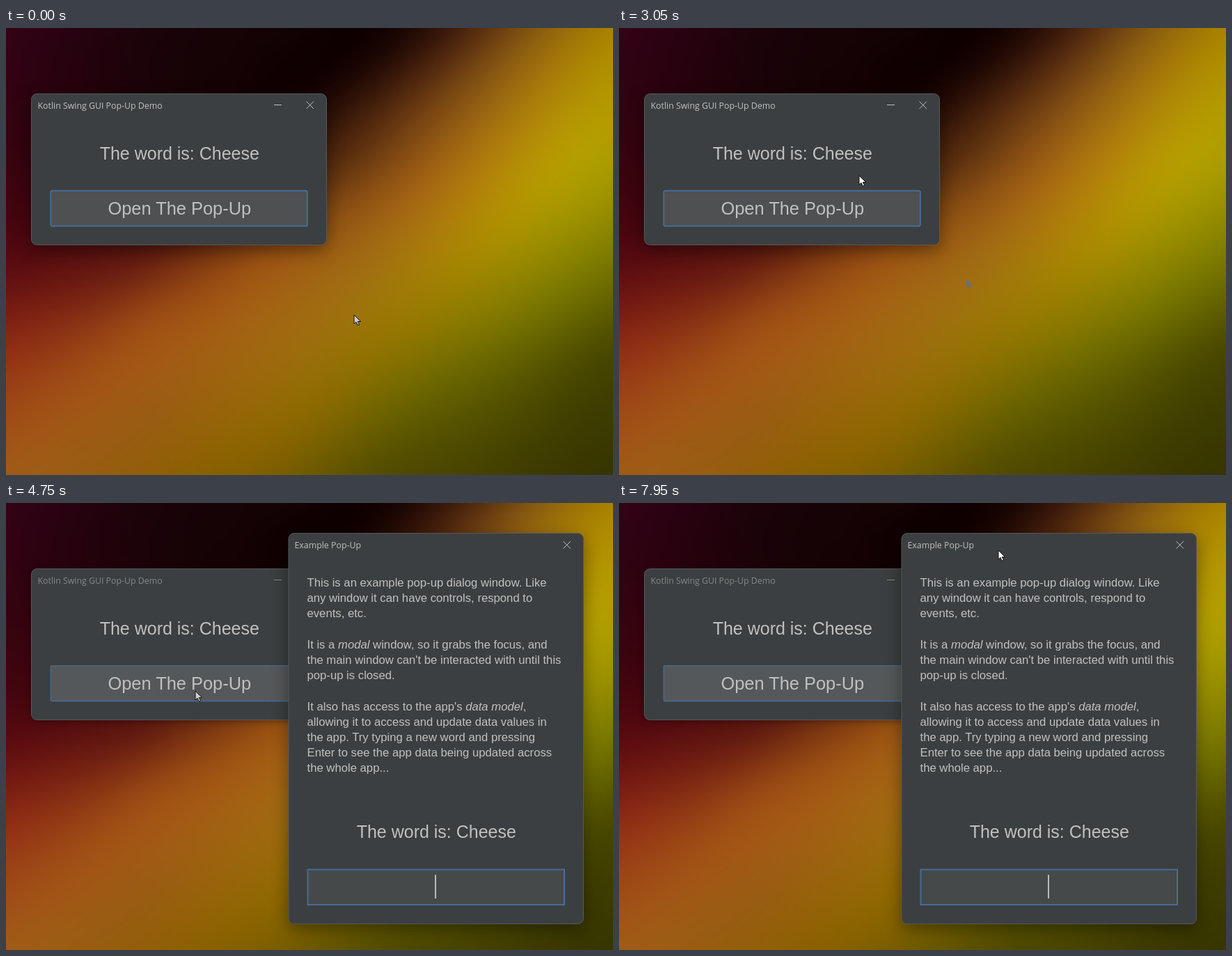
An HTML page with a canvas for the animation above (8 s loop, 872 by 642 pixels).

```html
<!DOCTYPE html>
<html lang="en">
<head>
<meta charset="utf-8">
<title>Pop-Up Demo</title>
<style>
  html, body { margin: 0; width: 100%; height: 100%; overflow: hidden; background: #140303; }
  canvas, svg { position: absolute; left: 0; top: 0; width: 872px; height: 642px; }
  text { fill: #c0c0c0; font-family: "Liberation Sans", Arial, sans-serif; white-space: pre; }
  .title { font: 12.35px "Open Sans", "Noto Sans", sans-serif; }
  .word, .label { font-size: 25px; text-anchor: middle; }
  .label { font-size: 25.4px; }
  .body { font-size: 16.7px; }
  .win { fill: #3c3f41; stroke: #55595c; }
  .active { filter: drop-shadow(0 7px 12px rgba(0, 0, 0, .4)); }
  .idle { filter: drop-shadow(0 2px 4px rgba(0, 0, 0, .3)); }
  .focus { stroke: #466d94; stroke-width: 2; }
  .icon { stroke: #c0c0c0; fill: none; }
</style>
</head>
<body>
<canvas id="back" width="436" height="321"></canvas>
<svg viewBox="0 0 872 642">
  <defs>
    <path id="arrow" d="M0 0V13L3 10.3L5.2 15L7.5 14L5.3 9.5H9.6Z"/>
  </defs>
  <g id="main">
    <rect id="frame" class="win" x="36.5" y="94.5" width="424" height="217" rx="8"/>
    <rect id="minHover" x="367" y="95" width="47" height="32" fill="#55575b"/>
    <text id="mainTitle" class="title" x="45.5" y="115.5">Kotlin Swing GUI Pop-Up Demo</text>
    <path id="minimise" class="icon" d="M385 110.5h11"/>
    <path class="icon" d="M431.5 105.5l10.5 10.5m0-10.5l-10.5 10.5"/>
    <text class="word" x="249.3" y="188.5">The word is: Cheese</text>
    <rect id="button" class="focus" x="64.3" y="233.7" width="368.5" height="50.8" rx="2"/>
    <text class="label" x="249.3" y="268">Open The Pop-Up</text>
  </g>
  <use id="ghost" href="#arrow" x="499" y="360" fill="#6e6e7c"/>
  <g id="popup">
    <rect class="win active" x="406" y="43.5" width="423.5" height="561" rx="8"/>
    <text class="title" x="414.5" y="65">Example Pop-Up</text>
    <path class="icon" d="M800.5 55l10.5 10.5m0-10.5l-10.5 10.5"/>
    <g id="lines"></g>
    <text class="word" x="618.3" y="481">The word is: Cheese</text>
    <rect class="focus" x="433.5" y="526.5" width="368.5" height="50.5" fill="#45494a"/>
    <rect id="caret" x="616" y="534" width="2" height="34" fill="#bbb"/>
  </g>
  <use id="cursor" href="#arrow" stroke="#111" stroke-width="1"/>
  <circle id="click" cx="271.5" cy="268.5" r="12.5" fill="rgba(226,216,10,.6)"/>
</svg>
<script>
const $ = id => document.getElementById(id);

// Wallpaper: smooth colour field through a few points (x, y, colour)
const spots = [
  [0, 0, '340316'], [200, 0, '1c030a'], [400, 0, '140303'], [560, 0, '180502'],
  [650, 0, '44200c'], [760, 0, '85580f'], [872, 0, 'a88200'],
  [0, 200, '3a040f'], [200, 150, '200408'], [420, 100, '160302'], [480, 200, '5f320f'],
  [560, 120, '5c300f'], [700, 100, '966411'], [872, 110, 'b29a00'], [800, 200, 'b49c00'],
  [600, 230, 'a46612'], [0, 330, '560a10'], [200, 330, '641e10'], [380, 330, '985212'],
  [520, 330, 'a06c12'], [700, 310, 'a88c00'], [872, 300, '868200'],
  [0, 450, '8a2a14'], [200, 420, '9a4a14'], [420, 450, '9e6c0e'], [600, 430, '907800'],
  [760, 400, '7a7600'], [872, 460, '4a4900'], [0, 642, 'a05a16'], [200, 560, '9a5c12'],
  [400, 580, '8a6600'], [560, 540, '6e6400'], [720, 560, '4e4c00'],
  [300, 642, '886000'], [540, 642, '544c00'], [872, 642, '383600']
];

// Distance is shortened along the diagonal so the bands run that way
function kernel(dx, dy) {
  const along = .5 * (.82 * dx - .57 * dy), across = .57 * dx + .82 * dy;
  return Math.sqrt(along * along + across * across + 1200);
}

function solveWeights() {
  const n = spots.length;
  const rows = spots.map(([x, y, hex]) => [
    ...spots.map(s => kernel(x - s[0], y - s[1])),
    ...[0, 2, 4].map(i => parseInt(hex.slice(i, i + 2), 16))
  ]);
  for (let c = 0; c < n; c++) {
    let p = c;
    for (let r = c; r < n; r++) if (Math.abs(rows[r][c]) > Math.abs(rows[p][c])) p = r;
    [rows[c], rows[p]] = [rows[p], rows[c]];
    for (let r = 0; r < n; r++) {
      if (r === c) continue;
      const f = rows[r][c] / rows[c][c];
      for (let k = c; k < n + 3; k++) rows[r][k] -= f * rows[c][k];
    }
  }
  return rows.map((row, i) => row.slice(n).map(v => v / row[i]));
}

function paintBack() {
  const weights = solveWeights(), ctx = $('back').getContext('2d');
  const img = ctx.createImageData(436, 321);
  for (let y = 0, i = 0; y < 321; y++) {
    for (let x = 0; x < 436; x++, i += 4) {
      let r = 0, g = 0, b = 0;
      for (let s = 0; s < spots.length; s++) {
        const k = kernel(2 * x + 1 - spots[s][0], 2 * y + 1 - spots[s][1]), w = weights[s];
        r += k * w[0];
        g += k * w[1];
        b += k * w[2];
      }
      img.data.set([r, g, b, 255], i);
    }
  }
  ctx.putImageData(img, 0, 0);
}

const body = `This is an example pop-up dialog window. Like
any window it can have controls, respond to
events, etc.

It is a <i>modal</i> window, so it grabs the focus, and
the main window can't be interacted with until this
pop-up is closed.

It also has access to the app's <i>data model</i>,
allowing it to access and update data values in
the app. Try typing a new word and pressing
Enter to see the app data being updated across
the whole app...`;
$('lines').innerHTML = body.split('\n').map((line, i) =>
  `<text class="body" x="432.5" y="${120 + i * 22.2}">` +
  line.replace('<i>', '<tspan font-style="italic">').replace('</i>', '</tspan>') + '</text>').join('');

// Pointer keys: time, x, y
const keys = [
  [990, 500, 412], [1127, 499, 360], [1332, 385, 110], [1470, 352, 76], [1600, 240, 95],
  [1744, 165, 140], [1950, 190, 240], [2200, 288, 318], [2400, 350, 290], [2560, 355, 222],
  [3045, 345, 212], [3375, 349, 200], [3660, 268, 202], [3930, 340, 199], [4130, 340, 199],
  [4400, 272, 270], [5150, 272, 270], [5500, 560, 430], [5900, 715, 500], [6200, 610, 460],
  [6420, 660, 400], [6600, 748, 440], [6719, 726, 495], [6900, 755, 430], [7200, 690, 280],
  [7540, 565, 170], [7700, 534, 105], [7946, 545, 68], [8000, 545, 68]
];

function slope(i, d) {
  const a = keys[i - 1], k = keys[i], b = keys[i + 1];
  if (!a || !b) return 0;
  const still = p => p[1] === k[1] && p[2] === k[2];
  return still(a) || still(b) ? 0 : (b[d] - a[d]) / (b[0] - a[0]);
}

function pointer(t) {
  if (t <= keys[0][0]) return keys[0].slice(1);
  const i = keys.findIndex(k => k[0] > t) - 1;
  const a = keys[i], b = keys[i + 1], span = b[0] - a[0], u = (t - a[0]) / span;
  const h = u * u * (3 - 2 * u);
  return [1, 2].map(d => Math.round(a[d] + (b[d] - a[d]) * h +
    span * u * (1 - u) * (slope(i, d) * (1 - u) - slope(i + 1, d) * u)));
}

// The screen refreshes in steps of about 68 ms
function stepped(t) {
  const [start, step] = t < 5150 ? [990, 68.5] : [5150, 68.2];
  return start + Math.floor((t - start) / step) * step;
}

const show = (id, on) => $(id).style.display = on ? '' : 'none';
const inside = (x, y, l, t, r, b) => x >= l && x < r && y >= t && y < b;

function draw() {
  const t = performance.now() % 8000, q = stepped(t), [x, y] = pointer(q);
  const open = t >= 4750, press = t >= 4700 && !open;
  const over = t < 2640 && inside(x, y, 64, 233, 433, 285);
  const resting = t < 990 || (open && t < 5150);

  show('popup', open);
  show('ghost', t >= 1190 && !open);
  show('click', press);
  show('minHover', t >= 1300 && t < 1560);
  show('caret', Math.floor(Math.max(0, q - 4750) / 500) % 2 === 0);
  $('frame').setAttribute('class', 'win ' + (open ? 'idle' : 'active'));
  $('mainTitle').style.fill = $('minimise').style.stroke = open ? '#858788' : '';
  $('button').setAttribute('fill', press ? '#5c6062' : open || over ? '#55585a' : '#4f5051');
  $('button').style.strokeWidth = press || open ? 1.3 : '';
  $('cursor').setAttribute('transform', `translate(${x} ${y})`);
  $('cursor').setAttribute('fill', resting ? '#ccc' : '#fff');
  requestAnimationFrame(draw);
}

paintBack();
draw();
</script>
</body>
</html>
```
